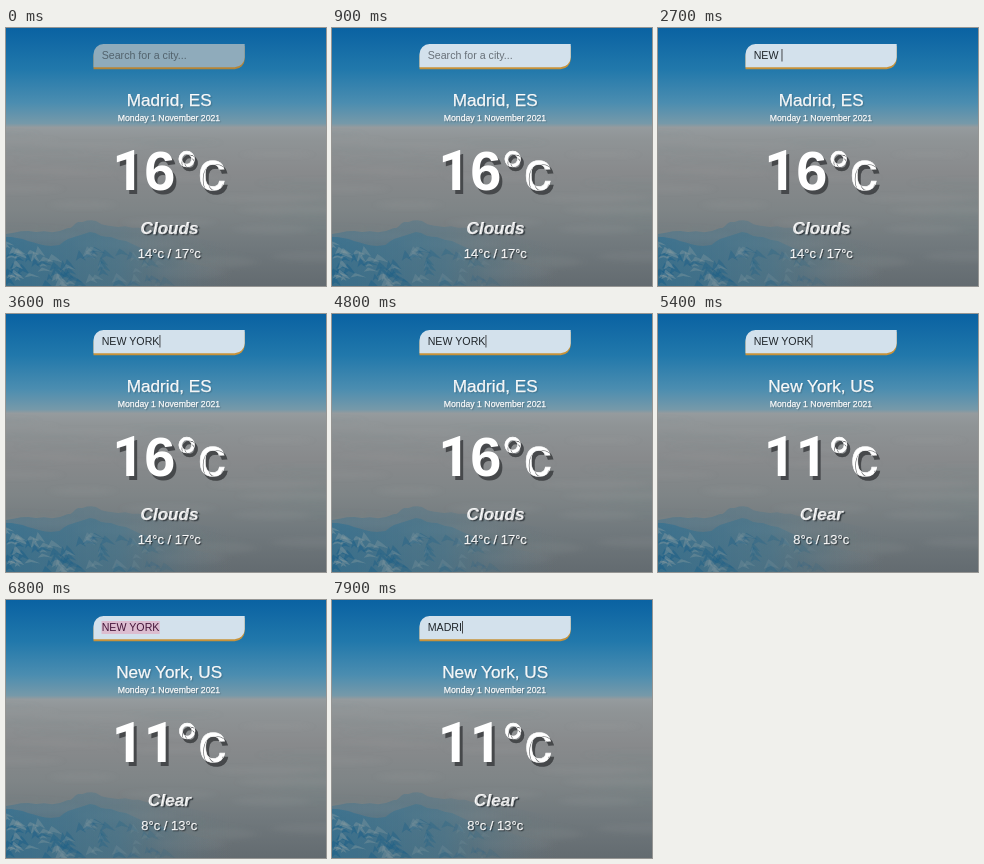
These frames come from a looping animation (320 px wide and 258 px high, 8 s). An HTML page:

```html
<!DOCTYPE html>
<html lang="en">
<head>
<meta charset="utf-8">
<title>Weather search</title>
<style>
  html, body { margin: 0; width: 100%; height: 100%; overflow: hidden; background: #176c9f; }
  svg { display: block; width: 100vw; height: 100vh; }
  text { font-family: "Liberation Sans", Arial, sans-serif; fill: #fff; white-space: pre; }
  .center { text-anchor: middle; stroke: #fff; stroke-width: .25px; }
  .soft { text-shadow: 1px 1px 1px rgba(40, 60, 70, .25); }
  .temp { font-size: 56px; stroke-width: .6px; text-shadow: 3px 4px 0 rgba(62, 64, 66, .88); }
  .temp .value { font-weight: bold; stroke: none; }
  .temp .one { font-family: Roboto, sans-serif; }
  .sky { font-size: 17.1px; font-weight: bold; font-style: italic; text-shadow: 1.5px 1.5px 1px rgba(30, 36, 42, .75); }
  .range { font-size: 13px; text-shadow: 1px 1px 1px rgba(25, 30, 35, .65); }
</style>
</head>
<body>
<svg viewBox="0 0 320 258" preserveAspectRatio="none">
  <defs>
    <linearGradient id="air" x2="0" y2="1">
      <stop offset="0" stop-color="#0a62a2"/>
      <stop offset=".16" stop-color="#2178ab"/>
      <stop offset=".29" stop-color="#4b8db0"/>
      <stop offset=".37" stop-color="#7699a9"/>
      <stop offset=".385" stop-color="#959b9e"/>
      <stop offset=".43" stop-color="#8f9496"/>
      <stop offset=".56" stop-color="#888a8c"/>
      <stop offset=".7" stop-color="#7f8587"/>
      <stop offset=".84" stop-color="#71797d"/>
      <stop offset="1" stop-color="#636b70"/>
    </linearGradient>
    <linearGradient id="rock" gradientUnits="userSpaceOnUse" x1="0" y1="0" x2="225" y2="0">
      <stop offset="0" stop-color="#2b6f93"/>
      <stop offset=".5" stop-color="#3f758f" stop-opacity=".8"/>
      <stop offset="1" stop-color="#627680" stop-opacity="0"/>
    </linearGradient>
    <filter id="blur" x="-30%" y="-100%" width="160%" height="300%"><feGaussianBlur stdDeviation="5 2"/></filter>
    <filter id="edge" x="-5%" y="-20%" width="110%" height="140%"><feGaussianBlur stdDeviation=".6"/></filter>
  </defs>
  <rect width="320" height="258" fill="url(#air)"/>
  <g id="clouds" filter="url(#blur)"></g>
  <g id="hills" filter="url(#edge)"></g>

  <path id="lip" transform="translate(0 2)"/>
  <path id="field"/>
  <rect id="selection" x="95.5" y="21" height="13" fill="#dcbdd0"/>
  <text id="query" x="95.7" y="31.3" font-size="10.65"></text>
  <rect id="caret" y="21" width=".8" height="12.5" fill="#222"/>

  <text id="city" class="center soft" x="163.2" y="78.4" font-size="17.2"></text>
  <text class="center soft" x="163" y="92.6" font-size="8.7">Monday 1 November 2021</text>
  <text class="center temp" x="163" y="161.5"><tspan id="degrees" class="value"></tspan><tspan>°c</tspan></text>
  <text id="sky" class="center sky" x="163.5" y="205.7"></text>
  <text id="range" class="center range" x="163.3" y="230"></text>
</svg>
<script>
const LOOP = 8000;
const $ = id => document.getElementById(id);

let seed = 11;
const random = () => (seed = seed * 16807 % 2147483647) / 2147483647;

function add(parent, tag, attributes) {
  const node = document.createElementNS("http://www.w3.org/2000/svg", tag);
  for (const name in attributes) node.setAttribute(name, attributes[name]);
  $(parent).append(node);
}

// Splits each segment of a ridge with a random vertical offset.
function roughen(points, rounds, amount) {
  for (let i = 0; i < rounds; i++, amount /= 2) {
    points = points.flatMap(([x, y], k) => {
      const next = points[k + 1];
      return next ? [[x, y], [(x + next[0]) / 2, (y + next[1]) / 2 + (random() - .5) * amount]] : [[x, y]];
    });
  }
  return points;
}

const line = points => "M" + points.map(p => p.map(v => v.toFixed(1)).join()).join("L");

function drawHills() {
  const ridges = [
    [[0, 206], [30, 204], [62, 200], [72, 194], [90, 193], [112, 199], [140, 202], [172, 207], [225, 216]],
    [[0, 209], [22, 213], [45, 218], [62, 211], [84, 204], [105, 209], [135, 220], [170, 230], [225, 246]]
  ];
  ridges.forEach((points, i) => {
    const ridge = roughen(points, 2, 5);
    add("hills", "path", { d: line(ridge) + "L225,258H0Z", fill: "url(#rock)", opacity: .38 + i * .22 });
  });
  // Shadowed and snowy slopes, thinning out towards the right.
  for (let i = 0; i < 80; i++) {
    const x = random() ** 1.4 * 160;
    const y = 213 + x * .06 + random() * 38;
    const w = 4 + random() * 8, h = 4 + random() * 7;
    const slope = [[x, y], [x + w * .4, y + h * .35], [x + w, y + h], [x + w * .2, y + h * .7], [x - w * .4, y + h]];
    add("hills", "path", { d: line(slope) + "Z", fill: i % 2 ? "#80979f" : "#175d87", opacity: .5 * (1 - x / 210) });
  }
}

function drawClouds() {
  for (let i = 0; i < 34; i++) {
    const depth = i / 34;
    add("clouds", "ellipse", {
      cx: random() * 340 - 10, cy: 104 + depth * 140 + random() * 5,
      rx: 30 + random() * 35, ry: 2 + depth * 4,
      fill: i % 2 ? "#a2a2a2" : "#6b7c84", opacity: .1
    });
  }
}

// Rounds the top left and bottom right corners only.
function leaf(x, y, w, h, r) {
  return `M${x + r},${y}h${w - r}v${h - r}a${r},${r} 0 0 1 ${-r},${r}h${r - w}v${r - h}a${r},${r} 0 0 1 ${r},${-r}Z`;
}

const reports = {
  madrid: { city: "Madrid, ES", degrees: "16", sky: "Clouds", range: "14°c / 17°c" },
  newYork: { city: "New York, US", degrees: "11", sky: "Clear", range: "8°c / 13°c" }
};

const typing = [
  [0, ""], [1600, "N"], [1900, "NE"], [2200, "NEW"], [2500, "NEW "],
  [2800, "NEW Y"], [3000, "NEW YO"], [3200, "NEW YOR"], [3400, "NEW YORK"],
  [7100, "M"], [7300, "MA"], [7500, "MAD"], [7700, "MADR"], [7900, "MADRI"]
];
const ENTER = 5100, SELECT = 6600, REPLACE = 7100;

const ease = p => p * p * (3 - 2 * p);
const mix = (a, b, p) => `rgb(${a.map((v, i) => Math.round(v + (b[i] - v) * p))})`;

let shown;
function showReport(report) {
  if (report === shown) return;
  shown = report;
  for (const id in report) $(id).textContent = report[id];
  // Roboto's 1 has no foot.
  $("degrees").innerHTML = report.degrees.replace(/1/g, '<tspan class="one">1</tspan>');
}

function render(t) {
  const focus = ease(Math.min(1, Math.max(0, (t - 50) / 250)));
  $("field").setAttribute("fill", mix([143, 171, 187], [211, 225, 236], focus));
  $("lip").setAttribute("fill", mix([181, 133, 55], [199, 146, 58], focus));

  const [typedAt, typed] = typing.filter(([start]) => start <= t).pop();
  const query = $("query");
  query.textContent = typed || "Search for a city...";

  const selected = t >= SELECT && t < REPLACE;
  query.style.fill = selected ? "#45163a" : typed ? "#20262b" : mix([83, 99, 109], [104, 113, 121], focus);
  const width = typed ? query.getComputedTextLength() : 0;
  $("selection").setAttribute("width", selected ? width + .5 : 0);

  const blinkOn = (t - typedAt) % 1000 < 500;
  $("caret").setAttribute("x", 95.8 + width);
  $("caret").style.display = typed && !selected && blinkOn ? "" : "none";

  showReport(t < ENTER ? reports.madrid : reports.newYork);
}

drawClouds();
drawHills();
for (const id of ["lip", "field"]) $(id).setAttribute("d", leaf(87.5, 16, 151.2, 23.3, 10));

const start = performance.now();
function tick() {
  render((performance.now() - start) % LOOP);
  requestAnimationFrame(tick);
}
tick();
</script>
</body>
</html>
```
